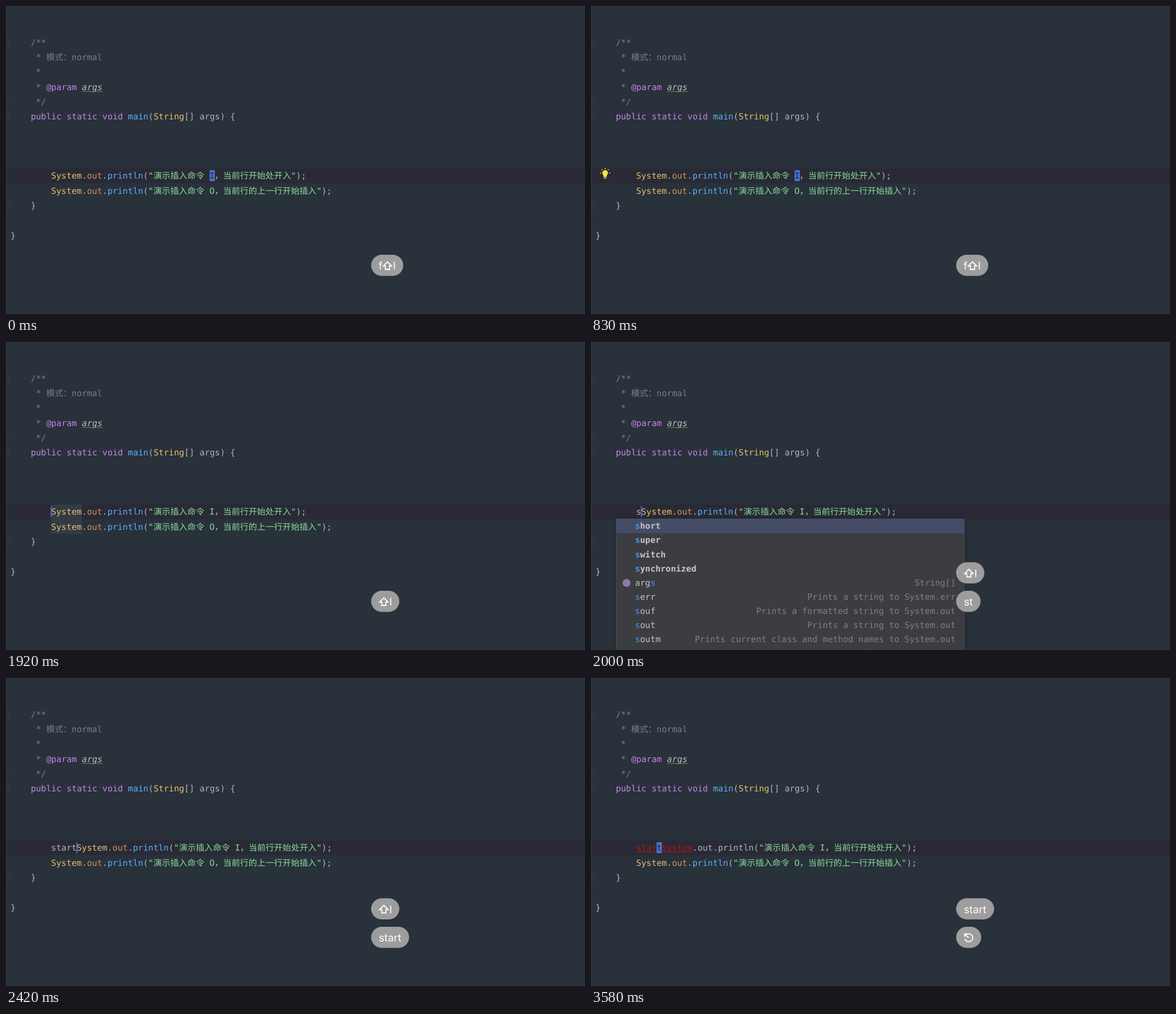
An HTML page with a canvas for the animation above (3660 ms loop, 1026 px wide and 546 px high).

```html
<!DOCTYPE html>
<html lang="zh-CN">
<head>
<meta charset="utf-8">
<title>Insert command demo</title>
<style>
html, body { margin: 0; width: 100%; height: 100%; overflow: hidden; background: #29313b; }
canvas { display: block; width: 1026px; height: 546px; }
</style>
</head>
<body>
<canvas id="stage"></canvas>
<script>
const W = 1026, H = 546, LOOP = 3660;
const canvas = document.getElementById('stage');
const ctx = canvas.getContext('2d');
const ratio = window.devicePixelRatio || 1;
canvas.width = W * ratio;
canvas.height = H * ratio;

const MONO = '15.05px "DejaVu Sans Mono", "Noto Sans CJK SC", "Noto Sans CJK", monospace';
const UI = '18.6px Inter, Roboto, sans-serif';
const LEFT = 44, CODE = 80, ADV = 9.06;
const C = {
  bg: '#29313b', row: '#292a35', plain: '#abb5c2', comment: '#76818d',
  key: '#c882e9', func: '#58b1fa', type: '#e8be6b', field: '#cd9352',
  str: '#88dd97', caret: '#4b70d0', error: '#a31b1a', pill: '#9d9d9d',
  match: '#4b95ef', hint: '#7d8083'
};

const baseline = i => 69.6 + 26.3 * i;

function box(x, y, w, h, color) {
  ctx.fillStyle = color;
  ctx.fillRect(x, y, w, h);
}

// Draws [color, text] runs one after another.
function runs(x, y, parts, style = '') {
  ctx.font = style + MONO;
  for (const [color, text] of parts) {
    ctx.fillStyle = color;
    ctx.fillText(text, x, y);
    x += ctx.measureText(text).width;
  }
}

function stroke(color, width, points, close) {
  ctx.strokeStyle = color;
  ctx.lineWidth = width;
  ctx.beginPath();
  points.forEach(([x, y]) => ctx.lineTo(x, y));
  if (close) ctx.closePath();
  ctx.stroke();
}

function statement(y, typed, message, broken) {
  const { plain, error, type, field, func, str } = C;
  const call = broken ? plain : func;
  runs(CODE, y, [
    [broken ? error : plain, typed], [broken ? error : type, 'System'], [plain, '.'],
    [broken ? plain : field, 'out'], [plain, '.'], [call, 'println'],
    [plain, '('], [str, '"' + message + '"'], [plain, ');']
  ]);
  if (broken) box(CODE, y + 1.5, ADV * (typed.length + 6) + 1, 1.3, error);
}

function gutter() {
  const line = '#38434c';
  box(0.5, 0, 1, H, '#35404a');
  for (const [y, dir] of [[65, 1], [170, -1], [196, 1], [354, -1]]) {
    stroke(line, 1, [[0, y - 5 * dir], [5.5, y - 5 * dir], [5.5, y + 2 * dir], [1, y + 6 * dir]]);
    stroke(line, 1, [[0, y], [3, y]]);
  }
}

function header() {
  const { comment, key, plain } = C;
  const note = ['/**', ' * 模式：normal', ' *', ' * ', ' */'];
  note.forEach((text, i) => runs(LEFT, baseline(i), [[comment, text]]));
  runs(LEFT + 3 * ADV, baseline(3), [[key, '@param']]);
  runs(LEFT + 10 * ADV, baseline(3), [['#b3c0d0', 'args']], 'italic ');
  const wave = [];
  for (let x = 135; x <= 171; x += 2) wave.push([x, x % 4 === 3 ? 152.5 : 150.5]);
  stroke('#b78f43', 1, wave);
  runs(LEFT, baseline(5), [
    [key, 'public static void '], [C.func, 'main'], [plain, '('],
    [C.type, 'String'], [plain, '[] args) {']
  ]);
}

function bulb() {
  const x = 25, y = 296, yellow = '#f5e73f';
  ctx.fillStyle = yellow;
  ctx.beginPath();
  ctx.arc(x, y, 5, 0, Math.PI * 2);
  ctx.fill();
  box(x - 3, y + 3, 6, 4, yellow);
  box(x - 2.5, y + 8, 5, 1.6, '#d5d6d8');
  for (let k = 0; k < 5; k++) {
    const a = Math.PI * (1 + k / 4), c = Math.cos(a), s = Math.sin(a);
    stroke(yellow, 1.5, [[x + 7 * c, y + 7 * s], [x + 9 * c, y + 9 * s]]);
  }
}

function shiftArrow(x, y) {
  stroke('#fff', 1.8, [
    [x, y - 7], [x + 7.5, y + 0.5], [x + 3.7, y + 0.5], [x + 3.7, y + 6.5],
    [x - 3.7, y + 6.5], [x - 3.7, y + 0.5], [x - 7.5, y + 0.5]
  ], true);
}

function escapeIcon(x, y) {
  ctx.strokeStyle = '#fff';
  ctx.lineWidth = 1.9;
  ctx.beginPath();
  ctx.arc(x, y, 7, -Math.PI * 0.6, Math.PI * 0.92);
  ctx.stroke();
  stroke('#fff', 1.9, [[x, y], [x - 7, y - 6.5]]);
  stroke('#fff', 1.9, [[x - 7.3, y - 1.5], [x - 7.3, y - 6.8], [x - 2, y - 6.8]]);
}

// '^' stands for the shift symbol, '!' for escape.
function pill(keys, slot, alpha = 1) {
  const x = 647, y = slot ? 390.5 : 441, mid = y + 18.7;
  ctx.font = UI;
  const fixed = { 'f^I': 57, '^I': 50, '!': 44.5 };
  const w = fixed[keys] || ctx.measureText(keys).width + 27.5;
  ctx.globalAlpha = alpha;
  ctx.fillStyle = C.pill;
  ctx.beginPath();
  ctx.roundRect(x, y, w, 37.4, 18.7);
  ctx.fill();
  ctx.fillStyle = '#fff';
  if (keys === '!') escapeIcon(x + 22.5, mid + 0.8);
  else if (keys.endsWith('^I')) {
    const shift = keys[0] === 'f' ? 6.5 : 0;
    if (shift) ctx.fillText('f', x + 13.3, mid + 7.3);
    shiftArrow(x + 22.5 + shift, mid + 0.8);
    ctx.fillText('I', x + 32.3 + shift, mid + 7.3);
  } else ctx.fillText(keys, x + 13.7, mid + 7.3);
  ctx.globalAlpha = 1;
}

const OPTIONS = [
  ['short'], ['super'], ['switch'], ['synchronized'],
  ['args', 'String[]'],
  ['serr', 'Prints a string to System.err'],
  ['souf', 'Prints a formatted string to System.out'],
  ['sout', 'Prints a string to System.out'],
  ['soutm', 'Prints current class and method names to System.out'],
  ['soutp', 'Prints method parameter names and values to System.out']
];

function popup() {
  ctx.save();
  ctx.shadowColor = 'rgba(0,0,0,.3)';
  ctx.shadowBlur = 8;
  box(44, 313, 617.5, 240, '#3c3d40');
  ctx.restore();
  stroke('#4b4e52', 1, [[44.5, H], [44.5, 313.5], [661.5, 313.5], [661.5, H]]);
  box(44, 313, 617.5, 26, '#444c66');
  OPTIONS.forEach(([word, hint], i) => {
    const y = 331.3 + 25.12 * i, light = '#c2c5c8';
    const parts = word === 'args' ? [[light, 'arg'], [C.match, 's']]
                                  : [[C.match, 's'], [light, word.slice(1)]];
    runs(78, y, parts, hint ? '' : 'bold ');
    if (hint) runs(646 - hint.length * ADV, y, [[C.hint, hint]]);
  });
  ctx.fillStyle = '#8f78ad';
  ctx.beginPath();
  ctx.arc(63, 427, 7, 0, Math.PI * 2);
  ctx.fill();
}

function blockCaret(x, letter) {
  box(x, 291, 9.3, 19.5, C.caret);
  runs(x, baseline(9), [['#20263a', letter]]);
}

const TYPED = [[2420, 'start'], [2330, 'star'], [2250, 'sta'], [2080, 'st'], [2000, 's']];
const KEYED = [[2420, 'start'], [2330, 'star'], [2170, 'sta'], [2000, 'st']];
const at = (list, t) => (list.find(([from]) => t >= from) || [0, ''])[1];
const fade = (t, from) => Math.max(0, Math.min(1, 1 - (t - from) / 200));

function pills(t) {
  if (t < 1000) pill('f^I', 0);
  else if (t < 2000) {
    if (t < 1600) pill('f^I', 1, fade(t, 1400));
    pill('^I', 0);
  } else if (t < 3170) {
    if (t < 2900) pill('^I', 1, fade(t, 2700));
    pill(at(KEYED, t), 0);
  } else {
    pill('start', 1);
    pill('!', 0);
  }
}

function draw(t) {
  ctx.setTransform(ratio, 0, 0, ratio, 0, 0);
  ctx.textRendering = 'geometricPrecision';
  ctx.textBaseline = 'alphabetic';
  box(0, 0, W, H, C.bg);
  box(1, 288, W, 26, C.row);
  box(40.5, 288, 1, 26, '#2f333e');
  gutter();
  header();

  const typed = at(TYPED, t);
  if (t >= 1080 && t < 2000) box(CODE, 288, 54.3, 52, '#323b46');
  statement(baseline(9), typed, '演示插入命令 I，当前行开始处开入', t >= 2750);
  statement(baseline(10), '', '演示插入命令 O，当前行的上一行开始插入');
  runs(LEFT, baseline(11), [[C.plain, '}']]);
  runs(8, baseline(13), [[C.plain, '}']]);

  if (t < 1000) blockCaret(360.8, 'I');
  else if (t < 3170) box(CODE - 0.7 + typed.length * ADV, 291, 2, 19.5, C.caret);
  else blockCaret(CODE + 4 * ADV, 't');

  if (t >= 330 && t < 1000) bulb();
  if (t >= 2000 && t < 2080) popup();
  pills(t);
}

const start = performance.now();
function tick() {
  draw((performance.now() - start) % LOOP);
  requestAnimationFrame(tick);
}
tick();
</script>
</body>
</html>
```
